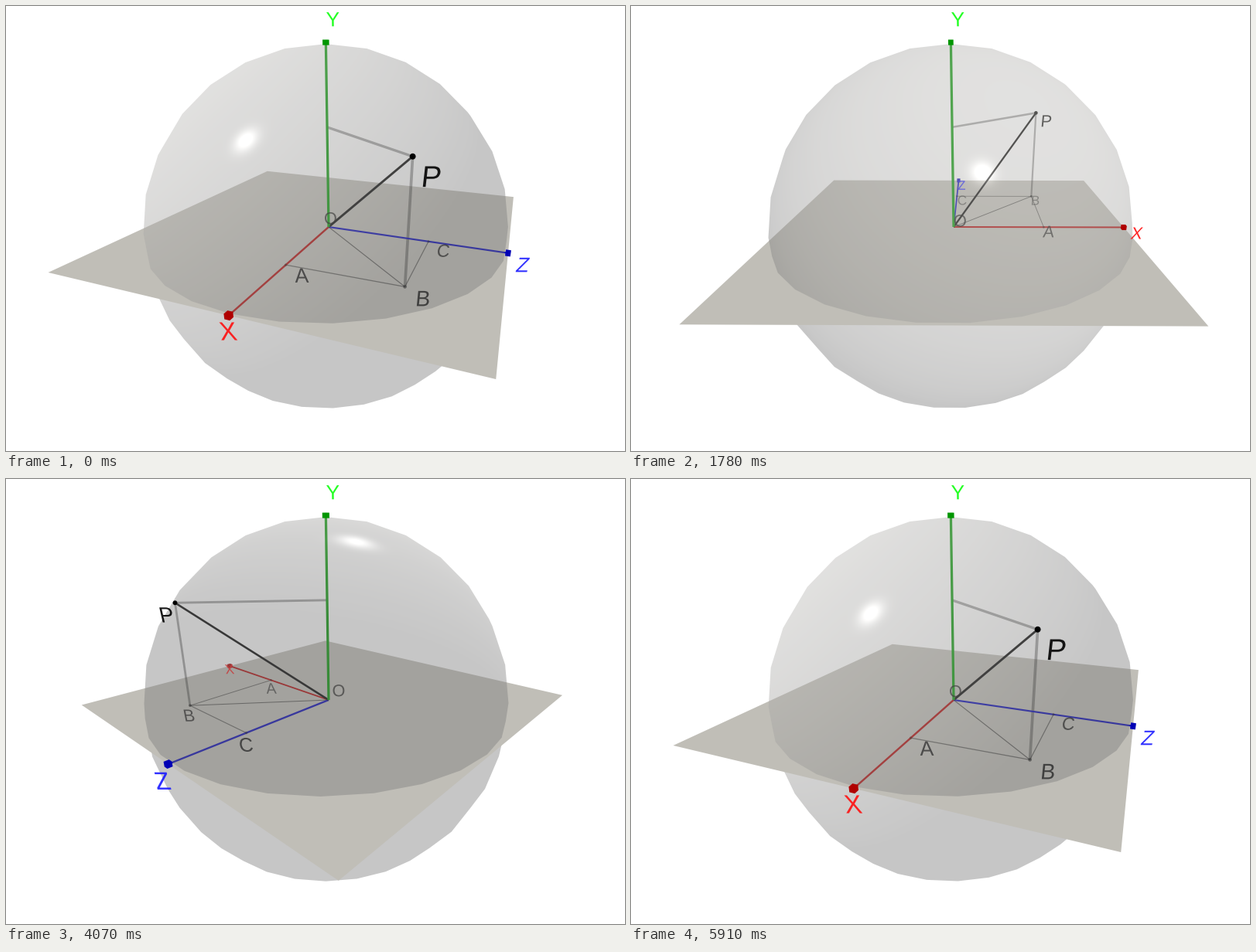
Animation, 800 px wide and 576 px high, one loop 5990 ms. Source, as a matplotlib script:

```python
import numpy as np
import matplotlib.pyplot as plt
from matplotlib.animation import FuncAnimation
from matplotlib.patches import Circle, PathPatch, Polygon
from matplotlib.path import Path
from matplotlib.textpath import TextPath

W, H, DPI = 800, 576, 100
LOOP, FRAMES = 5990, 150
STEP = LOOP / FRAMES
POSES = 78
START = 248.9                      # heading of the X axis at rest, degrees

# camera: principal point, screen place of the origin, scale there, tilt
CX, CY = 438, 291
OX, OY = 417, 286
SCALE, DIST = 219.4, 2.5787
TILT = np.radians(22.38)
SIN, COS = np.sin(TILT), np.cos(TILT)

RADIUS = 0.993
ALPHA = 0.444
PX, PZ, PY = 0.53, 0.59, 0.58      # the point P
PLANE = np.array([192, 190, 183]) / 255
RED, GREEN, BLUE = (0.69, 0, 0), (0, 0.59, 0), (0, 0, 0.71)


def project(right, back, up):
    """Screen x, y and relative depth of view-aligned points."""
    depth = 1 + (COS * back - SIN * up) / DIST
    x = CX + (OX - CX + SCALE * right) / depth
    y = CY + (OY - CY - SCALE * (SIN * back + COS * up)) / depth
    return x, y, depth


def place(x, z, y, turn):
    """Screen x, y, depth and backward distance of a scene point."""
    c, s = np.cos(turn), np.sin(turn)
    back = x * s + z * c
    return (*project(x * c - z * s, back, y), back)


def outline(x, z, y, turn):
    """Convex hull of the projected points."""
    px, py, *_ = place(x, z, y, turn)
    pts = sorted(zip(px.tolist(), py.tolist()))

    def chain(seq):
        out = []
        for p in seq:
            while len(out) > 1 and (
                (out[-1][0] - out[-2][0]) * (p[1] - out[-2][1])
                <= (out[-1][1] - out[-2][1]) * (p[0] - out[-2][0])
            ):
                out.pop()
            out.append(p)
        return out[:-1]

    return np.array(chain(pts) + chain(pts[::-1]))


# faceted ball: 15 stacks, 30 slices
lat = np.radians(np.arange(-90, 91, 12))
lon = np.radians(np.arange(0, 360, 12))
lat[-1] = np.pi / 2
LAT, LON = np.meshgrid(lat, lon)
ball = RADIUS * np.array([
    (np.cos(LAT) * np.cos(LON)).ravel(),
    (np.cos(LAT) * np.sin(LON)).ravel(),
    np.sin(LAT).ravel(),
])
rim = RADIUS * np.cos(np.radians(6)) * np.array(
    [np.cos(lon), np.sin(lon), 0 * lon])
dome = np.hstack([ball[:, ball[2] > 0], rim])

# per-pixel normals and mirror directions on the ball
X0, X1, Y0, Y1 = 172, 656, 42, 526
UPPER_END, LOWER_START = 418, 300
gx, gy = np.meshgrid(np.arange(X0, X1) + 0.5, np.arange(Y0, Y1) + 0.5)
ray = np.stack([gx - CX, gy - CY, np.full_like(gx, SCALE * DIST)])
ray /= np.linalg.norm(ray, axis=0)
centre = np.array([(OX - CX) / SCALE, (OY - CY) / SCALE, DIST])
along = np.tensordot(centre, ray, 1)
gap = np.maximum(along ** 2 - centre @ centre + RADIUS ** 2, 0)
normal = (along - np.sqrt(gap)) * ray - centre[:, None, None]
normal /= np.linalg.norm(normal, axis=0)
mirror = ray - 2 * (normal * ray).sum(0) * normal
normal, mirror = normal.astype("f4"), mirror.astype("f4")


def shade(turn):
    """Translucent ball lit by a lamp that turns with the scene."""
    az, el = turn - np.radians(62), np.radians(50)
    r, b, u = np.cos(el) * np.cos(az), np.cos(el) * np.sin(az), np.sin(el)
    lamp = np.array([r, -SIN * b - COS * u, COS * b - SIN * u], "f4")
    diffuse = np.maximum(np.tensordot(lamp, normal, 1), 0)
    glint = 115 * np.exp(170 * (np.tensordot(lamp, mirror, 1) - 1))
    img = np.empty(diffuse.shape + (4,), np.uint8)
    for i, tint in enumerate((63, 61.7, 58.6)):
        img[..., i] = np.minimum(127 + tint * diffuse + glint, 255)
    img[..., 3] = round(255 * ALPHA)
    return img


cache = {}


def scene(pose):
    if pose not in cache:
        turn = np.radians(START + 360 * pose / POSES)
        cache[pose] = (turn, shade(turn),
                       outline(*ball, turn), outline(*dome, turn))
    return cache[pose]


fig = plt.figure(figsize=(W / DPI, H / DPI), dpi=DPI, facecolor="white")
ax = fig.add_axes([0, 0, 1, 1])
ax.set_axis_off()


def shape(color, z):
    return ax.add_patch(Polygon([(0, 0), (1, 0), (0, 1)], fc=color, lw=0, zorder=z))


def picture(top, bottom, z):
    im = ax.imshow(np.zeros((bottom - top, X1 - X0, 4), np.uint8),
                   extent=(X0, X1, bottom, top), interpolation="nearest", zorder=z)
    clip = Polygon([(0, 0), (1, 0), (0, 1)], transform=ax.transData)
    return im, clip


low_img, low_clip = picture(LOWER_START, Y1, 1)
veil = shape("white", 2)
floor = shape(PLANE, 3)
top_img, top_clip = picture(Y0, UPPER_END, 6)
ax.set_xlim(0, W)
ax.set_ylim(H, 0)
ax.set_aspect("auto")

O, B, P = (0, 0, 0), (PX, PZ, 0), (PX, PZ, PY)
# ends, colour, opacity, width
segments = [
    (O, B, "black", 0.55, 1.0),
    ((PX, 0, 0), B, "black", 0.5, 1.0),
    ((0, PZ, 0), B, "black", 0.5, 1.0),
    ((0, 0, PY), P, "black", 0.37, 2.6),
    (P, B, "black", 0.37, 2.6),
    (O, (1, 0, 0), RED, 1, 2.0),
    (O, (0, 1, 0), BLUE, 1, 2.0),
    (O, P, "black", 1, 2.4),
    (O, (0, 0, 1), GREEN, 1, 3.0),
]
lines = [ax.plot([], [], color=c, alpha=a, zorder=4, solid_capstyle="butt",
                 scalex=False, scaley=False)[0]
         for _, _, c, a, _ in segments]

# centre, radius, opacity
spots = [(P, 2.6, 1), (B, 1.7, 0.6), ((PX, 0, 0), 1.4, 0.5), ((0, PZ, 0), 1.4, 0.5)]
dots = [ax.add_patch(Circle((0, 0), 1, fc="black", lw=0, alpha=a, zorder=5))
        for _, _, a in spots]

tips = [((1, 0, 0), RED), ((0, 1, 0), BLUE), ((0, 0, 1), GREEN)]
cubes = [shape(c, 7) for _, c in tips]
corner = 0.0125 * np.array(
    [(i, j, k) for i in (-1, 1) for j in (-1, 1) for k in (-1, 1)]).T

# letter, anchor, screen offset, cap height, colour
labels = [
    ("X", (1.05, 0, 0), (6, 7.5), 15, (1, 0.06, 0.06)),
    ("Y", (0, 0, 1), (7.7, -25.5), 15.5, (0.05, 1, 0.05)),
    ("Z", (0, 1.05, 0), (5, 11.5), 16, (0.1, 0.1, 1)),
    ("P", (PX * 1.09, PZ * 1.09, PY), (6.8, 13.5), 17, "black"),
    ("A", (PX, 0.045, 0), (8, 9.5), 15, "black"),
    ("B", (PX, PZ + 0.045, 0), (8, 9.5), 14.5, "black"),
    ("C", (0, PZ + 0.045, 0), (8, 9.5), 15, "black"),
    ("O", (0, -0.03, 0), (8.5, -10.5), 15.5, "black"),
]


def glyph(ch):
    """Letter outline of height one, centred on zero."""
    path = TextPath((0, 0), ch, size=100, prop={"family": "Liberation Sans"})
    box = path.get_extents()
    mid = np.array([box.x0 + box.x1, box.y0 + box.y1]) / 2
    return (path.vertices - mid) / box.height, path.codes


glyphs = [glyph(row[0]) for row in labels]
letters = [ax.add_patch(PathPatch(Path([(0, 0), (1, 1)]), fc=row[4], lw=0, zorder=5))
           for row in labels]


def draw_letter(patch, row, outlines, turn):
    name, anchor, (dx, dy), size, _ = row
    x, y, depth, back = place(*anchor, turn)
    x, y, size = x + dx / depth, y + dy / depth, size / depth
    verts, codes = outlines
    lean = (x - CX) / 1000
    patch.set_path(Path(np.column_stack([
        x + size * (verts[:, 0] + lean * verts[:, 1]),
        y - size * verts[:, 1]]), codes))
    if name in "ABCO":
        patch.set_alpha(float(np.clip(1.7 - depth, 0.45, 0.92)))
    else:
        patch.set_alpha(0.9)
        patch.set_zorder(8 if name == "Y" or back < 0.05 else 5)


def pose_at(i):
    """The turn goes in even steps after a short first hold."""
    if i == 0:
        return 0
    return int(min(((i + 1) * STEP - 20) / 76.5 + 1.12, POSES))


def update(i):
    turn, img, full, upper = scene(pose_at(i))

    low_img.set_data(img[LOWER_START - Y0:])
    top_img.set_data(img[:UPPER_END - Y0])
    for im, clip, pts in ((low_img, low_clip, full), (top_img, top_clip, upper)):
        clip.set_xy(pts)
        im.set_clip_path(clip)
    veil.set_xy(upper)
    square = np.array([(1, 1, 0), (-1, 1, 0), (-1, -1, 0), (1, -1, 0)]).T
    floor.set_xy(np.column_stack(place(*square, turn)[:2]))

    for line, (p, q, _, _, width) in zip(lines, segments):
        x, y, depth, _ = place(*np.array([p, q]).T, turn)
        line.set_data(x, y)
        line.set_linewidth(width / depth.mean() * 72 / DPI)

    for dot, (p, r, _) in zip(dots, spots):
        x, y, depth, back = place(*p, turn)
        dot.center = x, y
        dot.set_radius(r / depth)
        if p is P:
            dot.set_zorder(7 if back < 0 else 5)

    for cube, (p, _) in zip(cubes, tips):
        cube.set_xy(outline(*(corner + np.array(p)[:, None]), turn))
        cube.set_zorder(7 if p[2] or place(*p, turn)[3] < 0.05 else 5)

    for patch, row, outlines in zip(letters, labels, glyphs):
        draw_letter(patch, row, outlines, turn)
    return []


anim = FuncAnimation(fig, update, frames=FRAMES, interval=STEP,
                     repeat=True, repeat_delay=0, blit=False)
plt.show()
```
